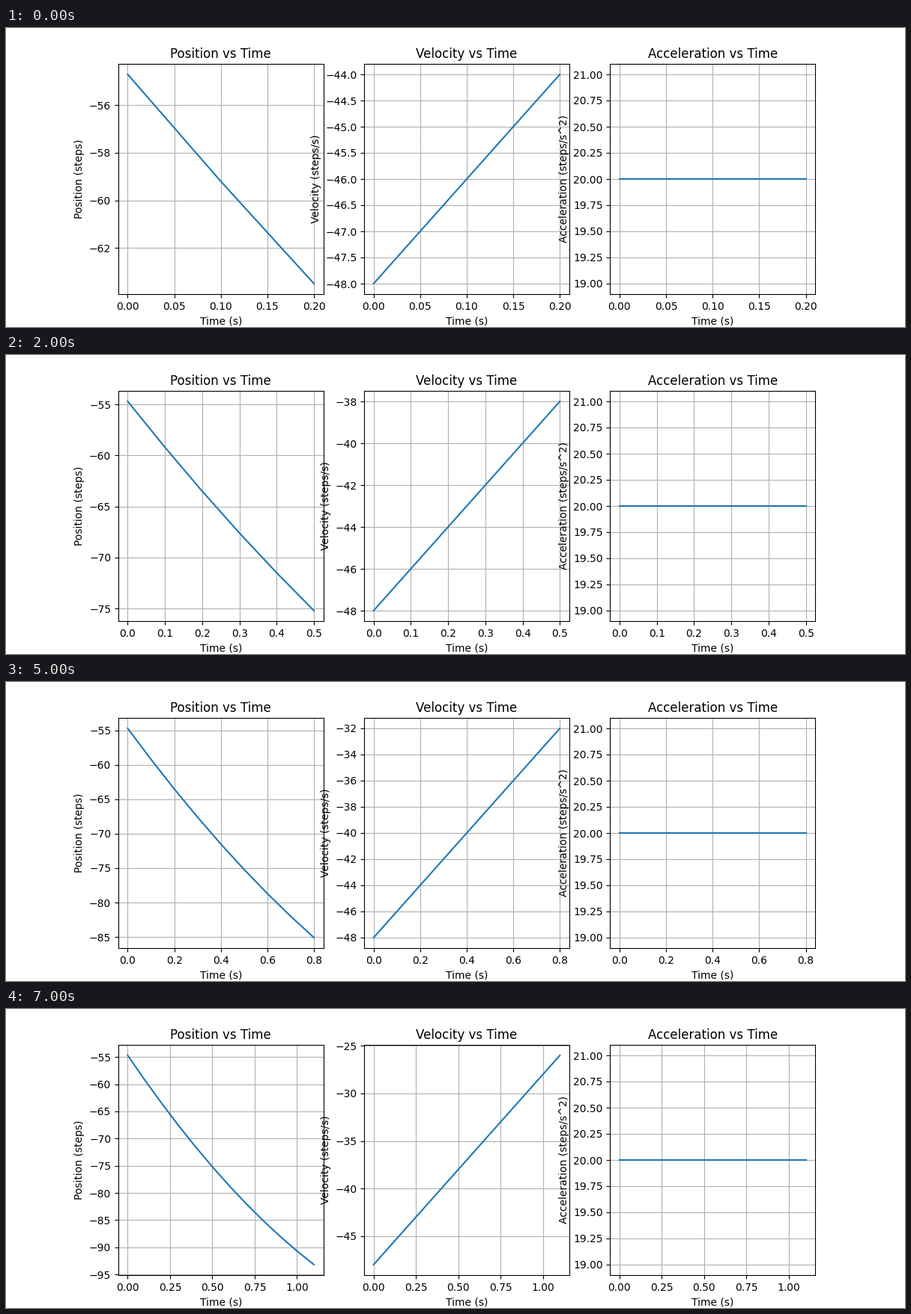
Write a matplotlib script that moves like this. It is 1200 px wide and 400 px high and loops after 8000 ms.

```python
import matplotlib.pyplot as plt
import numpy as np
from matplotlib.animation import FuncAnimation

DT = 0.1
ACC = 20.0
V0 = -48.0
P0 = -54.7
FRAMES = 8
INTERVAL = 1000

PANELS = [
    ("Position", "steps"),
    ("Velocity", "steps/s"),
    ("Acceleration", "steps/s^2"),
]

fig, axes = plt.subplots(1, 3, figsize=(12, 4), dpi=100)


def motion(last):
    """Time, position, velocity and acceleration for steps 0 to last."""
    t = np.arange(last + 1) * DT
    velocity = V0 + ACC * t
    # Each step adds the new velocity times DT plus half ACC times DT squared.
    position = P0 + (V0 + ACC * DT) * t + ACC / 2 * t**2
    return t, position, velocity, np.full_like(t, ACC)


def draw(frame):
    # Ten steps of time are spread over eight pictures.
    last = 2 + round(frame * 9 / (FRAMES - 1))
    t, *series = motion(last)
    for ax, values, (name, unit) in zip(axes, series, PANELS):
        ax.clear()
        ax.plot(t, values)
        ax.set_title(f"{name} vs Time")
        ax.set_xlabel("Time (s)")
        ax.set_ylabel(f"{name} ({unit})")
        ax.grid(True)
    return []


anim = FuncAnimation(fig, draw, frames=FRAMES, init_func=lambda: draw(0),
                     interval=INTERVAL, repeat=True, repeat_delay=0)
plt.show()
```
